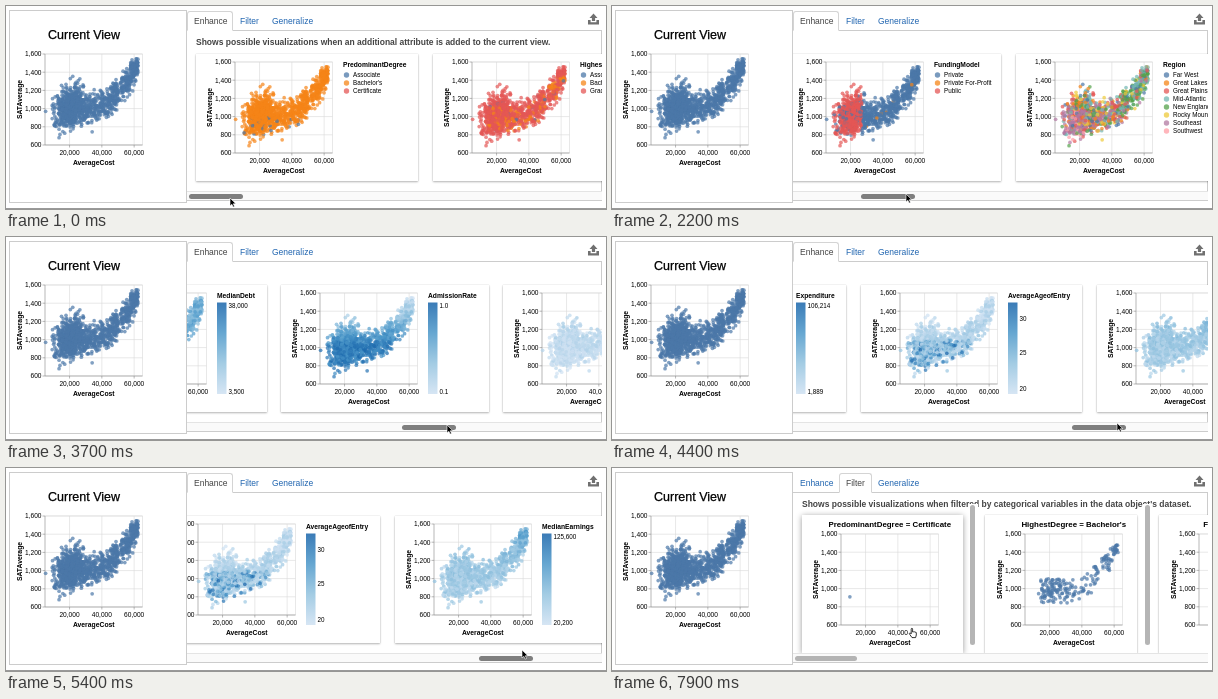
These frames come from a looping animation (600 px wide and 203 px high, 8 s). An HTML page with a canvas:

```html
<!DOCTYPE html>
<html lang="en">
<head>
<meta charset="utf-8">
<title>Recommended views</title>
<style>
html, body { margin: 0; width: 100%; height: 100%; overflow: hidden; background: #fff; }
#stage { position: relative; width: 600px; height: 203px; overflow: hidden; background: #fff;
  font-family: "Liberation Sans", Arial, sans-serif; }
#stage div, #stage svg, canvas { position: absolute; box-sizing: border-box; }
svg { overflow: visible; left: 0; top: 0; }
text { font-family: "Liberation Sans", Arial, sans-serif; }
.left { left: 3px; top: 4px; width: 178px; height: 193px; border: 1px solid #ccc; }
.right { left: 181px; top: 24px; width: 415px; height: 171px; border: 1px solid #ccc; border-left: 0; }
.heading { left: 42px; top: 21.5px; font-size: 12.5px; line-height: 15px; white-space: nowrap; -webkit-text-stroke: .25px #000; }
.tab { top: 5px; height: 20px; padding-left: 6px; border: 1px solid transparent; border-radius: 3px 3px 0 0;
  font-size: 8.5px; line-height: 18px; color: #2065b0; white-space: nowrap; }
.tab.hover { background: #eee; }
.tab.on { background: #fff; color: #444; border-color: #d4d4d4; border-bottom-color: #fff; }
.clip { left: 181px; top: 25px; width: 415px; height: 161px; overflow: hidden; }
.page { left: -181px; top: -25px; width: 0; height: 0; }
.note { left: 190px; top: 31px; font: bold 8.5px/10px "Liberation Sans", Arial, sans-serif; color: #444; white-space: nowrap; }
.card { background: #fff; box-shadow: 0 1px 2px rgba(0,0,0,.28), 0 0 1px rgba(0,0,0,.2); }
.card.lift { box-shadow: 0 1px 6px rgba(0,0,0,.4); }
.gutter { top: 36px; width: 9px; height: 142px; background: #fff; }
.gutter::after { content: ""; position: absolute; left: 1.5px; top: 1px; width: 5px; height: 140px; border-radius: 3px; background: #b5b5b5; }
.track { left: 181px; top: 185px; width: 415px; height: 10px; background: #fafafa; border: solid #e4e4e4; border-width: 1px 0 0; border-bottom: 1px solid #ccc; }
#thumb { left: 183px; top: 188px; height: 5px; border-radius: 3px; }
.base { left: 0; top: 202px; width: 600px; height: 1px; background: #999; }
</style>
</head>
<body>
<div id="stage">
  <div class="left"></div>
  <div class="heading">Current View</div>
  <div class="right"></div>
  <div class="tab" style="left:181px;width:46px">Enhance</div>
  <div class="tab" style="left:227px;width:33px">Filter</div>
  <div class="tab" style="left:259px;width:54px">Generalize</div>
  <svg width="600" height="203"><path fill="#707070" d="M587.5 7.5l4 4.5h-2.4v3h-3.2v-3h-2.4zM582 14h2.6v2.2h5.8v-2.2h2.6v4.6h-11z"/></svg>
  <div class="clip"><div class="page" id="enhance"></div><div class="page" id="filter"></div></div>
  <div class="track"></div>
  <div id="thumb"></div>
  <div class="base"></div>
</div>
<script>
const LOOP = 8000, STEP = 100, SCROLL_RATIO = 7.2;
const PLOT_W = 97.5, PLOT_H = 91;
const PALETTE = ['#4c78a8', '#f58518', '#e45756', '#72b7b2', '#54a24b', '#eeca3b', '#b279a2', '#ff9da6'];
const BLUES = [[207, 225, 242], [147, 195, 223], [75, 151, 201], [24, 100, 170]];
const stage = document.getElementById('stage');
const enhance = document.getElementById('enhance');
const filter = document.getElementById('filter');
const thumb = document.getElementById('thumb');
const tabs = document.querySelectorAll('.tab');

let seed = 20;
const rand = () => (seed = (seed * 16807) % 2147483647) / 2147483647;
const gauss = () => (rand() + rand() + rand() - 1.5) * 2;
const clamp = (v, a, b) => Math.min(b, Math.max(a, v));
const px = cost => (cost - 4.8) * 1.615;
const py = sat => PLOT_H * (1600 - sat) / 1000;
const trend = c => 990 + 510 * Math.max(0, (c - 28) / 34) ** 2.3;

function makeSchools() {
  const list = [[5.2, 970], [13.5, 680], [17, 730], [20.5, 1330], [34, 745], [22, 1355]]
    .map(([c, s]) => ({ c, s, low: false }));
  for (let i = 0; i < 1250; i++) {
    const k = rand(), low = k < .4;
    const c = low ? 20.5 + 5 * gauss() : k < .8 ? 15 + 35 * rand() : 44 + 18.5 * Math.sqrt(rand());
    const s = low ? 1020 + 105 * gauss() + 5 * (c - 20) : trend(c) + 78 * gauss();
    if (c > 9 && s > 690 && s < 1550) list.push({ c, s, low });
  }
  for (const p of list) { p.a = rand(); p.b = rand(); p.up = clamp((p.s - 900) / 600, 0, 1); }
  return list;
}
const schools = makeSchools();

function ramp(v) {
  const f = clamp(v, 0, .999) * 3, i = Math.floor(f);
  return `rgb(${BLUES[i].map((n, j) => Math.round(n + (BLUES[i + 1][j] - n) * (f - i)))})`;
}

const label = (x, y, str, opt = '') => `<text x="${x}" y="${y}" ${opt}>${str}</text>`;

function axes() {
  let grid = '', ticks = '', words = '';
  for (let s = 600; s <= 1600; s += 200) {
    grid += `M0 ${py(s)}H${PLOT_W}`;
    ticks += `M-2.5 ${py(s)}H0`;
    words += label(-3.5, py(s) + 2.3, s.toLocaleString('en-US'), 'text-anchor="end"');
  }
  for (const c of [20, 40, 60]) {
    grid += `M${px(c)} 0V${PLOT_H}`;
    ticks += `M${px(c)} ${PLOT_H}v2.5`;
    words += label(px(c), PLOT_H + 10, c + ',000', 'text-anchor="middle"');
  }
  const bold = 'text-anchor="middle" font-weight="bold" font-size="6.8"';
  return `<g fill="none" stroke-width=".6"><path stroke="#d8d8d8" d="${grid}M0 0H${PLOT_W}V${PLOT_H}"/>
    <path stroke="#888" d="${ticks}M0 0V${PLOT_H}H${PLOT_W}"/></g><g font-size="6.6">${words}</g>
    ${label(PLOT_W / 2, PLOT_H + 19.8, 'AverageCost', bold)}
    ${label(-PLOT_H / 2, -22.8, 'SATAverage', bold + ' transform="rotate(-90)"')}`;
}

function add(parent, cls, css, html = '') {
  const el = document.createElement('div');
  el.className = cls;
  el.style.cssText = css;
  el.innerHTML = html;
  parent.append(el);
  return el;
}

function chart(parent, x, y, points, color, extra = '') {
  const box = add(parent, '', `left:${x}px;top:${y}px`, `<svg width="1" height="1">${axes()}${extra}</svg>`);
  const cv = document.createElement('canvas'), dpr = window.devicePixelRatio || 1;
  cv.width = 106 * dpr; cv.height = 100 * dpr;
  cv.style.cssText = 'left:-4px;top:-4px;width:106px;height:100px';
  const g = cv.getContext('2d');
  g.scale(dpr, dpr);
  g.translate(4, 4);
  g.globalAlpha = .7;
  for (const p of points) {
    g.fillStyle = color(p);
    g.beginPath();
    g.arc(px(p.c), py(p.s), 1.85, 0, 7);
    g.fill();
  }
  box.append(cv);
}

const legendTitle = str => label(108, 4.8, str, 'font-weight="bold" font-size="6.7"');

function swatches(title, names) {
  return legendTitle(title) + names.map((n, i) =>
    `<circle cx="111.5" cy="${13 + i * 8}" r="2.7" fill="${PALETTE[i]}" opacity=".75"/>` +
    label(118, 15.2 + i * 8, n, 'font-size="6.3"')).join('');
}

function gradient(title, marks) {
  const id = 'g' + title;
  const stops = [0, 1, 2, 3].map(i => `<stop offset="${i / 3}" stop-color="${ramp(1 - i / 3)}"/>`).join('');
  return legendTitle(title) + `<linearGradient id="${id}" x2="0" y2="1">${stops}</linearGradient>
    <rect x="108" y="9.5" width="9.5" height="91.5" fill="url(#${id})" opacity=".85"/>` +
    marks.map(([str, y]) => label(119.5, y + 2.2, str, 'font-size="6.3"')).join('');
}
const ends = (top, bottom) => [[top, 13], [bottom, 98.5]];

const cat = fn => p => PALETTE[fn(p)];
const num = fn => p => ramp(fn(p) + (p.a - .5) * .3);

function region(p) {
  if (p.c > 45 && p.b < .5) return p.a < .45 ? 3 : 4;
  if (p.c < 24 && p.s < 1080 && p.b < .5) return p.a < .75 ? 6 : 7;
  return +'01122334566'[Math.floor(p.a * 11)];
}

const bachelor = p => p.a < (p.low ? .1 : .22) && p.c > 13 && p.s < 1480 && Math.abs(p.s - trend(p.c) + 20) < 140;
const CARDS = [
  [190, 222, swatches('PredominantDegree', ['Associate', "Bachelor's", 'Certificate']),
    cat(p => p.s < 1000 && p.c < 46 && p.a < .06 ? 0 : 1)],
  [427, 208, swatches('HighestDegree', ['Associate', "Bachelor's", 'Graduate']),
    cat(p => bachelor(p) ? 1 : p.a > .985 ? 0 : 2)],
  [650, 214, swatches('FundingModel', ['Private', 'Private For-Profit', 'Public']),
    cat(p => p.c < 27 && p.a < .85 ? 2 : p.b < .012 ? 1 : 0)],
  [879, 218, swatches('Region', ['Far West', 'Great Lakes', 'Great Plains', 'Mid-Atlantic', 'New England',
    'Rocky Mountains', 'Southeast', 'Southwest']), cat(region)],
  [1112, 228, gradient('MedianFamilyIncome', ends('116,545', '15,328')), num(p => .1 + .5 * p.up + .007 * p.c)],
  [1355, 228, gradient('AverageFacultySalary', ends('19,862', '1,476')), num(p => .25 + .6 * p.up)],
  [1598, 197, gradient('MedianDebt', ends('38,000', '3,500')), num(() => .5)],
  [1809, 208, gradient('AdmissionRate', ends('1.0', '0.1')), num(p => .82 - .9 * Math.max(0, p.up - .2))],
  [2031, 197, gradient('Expenditure', ends('106,214', '1,889')), num(p => .02 + .35 * p.up * p.up)],
  [2243, 221, gradient('AverageAgeofEntry', [['30', 26], ['25', 60], ['20', 95.5]]),
    num(p => p.s < 1080 && p.b < .35 ? .35 + 1.7 * p.b : .2 - .12 * p.up)],
  [2479, 211, gradient('MedianEarnings', ends('125,600', '20,200')), num(p => .22 + .34 * p.up * p.up)]
];

const blue = () => PALETTE[0];
chart(stage, 39, 47.5, schools, blue);

add(enhance, 'note', '', 'Shows possible visualizations when an additional attribute is added to the current view.');
for (const [x, w, legend, color] of CARDS) {
  const card = add(enhance, 'card', `left:${x}px;top:48px;width:${w}px;height:127px`);
  chart(card, 39, 8, schools, color, legend);
}

add(filter, 'note', '', "Shows possible visualizations when filtered by categorical variables in the data object's dataset.");
const FILTERS = [
  [190, 161, 38.5, 'PredominantDegree = Certificate', [{ c: 10.3, s: 910 }]],
  [373, 152, 39.5, "HighestDegree = Bachelor's", schools.filter(bachelor)],
  [547, 152, 39.5, 'FundingModel = Private', schools.filter(p => p.c > 27)]
];
FILTERS.forEach(([x, w, dx, title, points], i) => {
  const card = add(filter, i ? 'card' : 'card lift', `left:${x}px;top:47px;width:${w}px;height:138px`);
  chart(card, dx, 19, points, blue,
    label(PLOT_W / 2, -7.2, title, 'text-anchor="middle" font-weight="bold" font-size="7.9"'));
});
for (const x of [356.5, 531]) add(filter, 'gutter', `left:${x}px`);

const pointer = add(stage, '', 'left:0;top:0', `<svg width="12" height="12">
  <path id="arrow" d="M0 0v8l1.9-1.7 1.2 2.8 1.4-.6-1.2-2.7h2.6z" fill="#000" stroke="#fff" stroke-width=".6"/>
  <path id="hand" transform="translate(-3 0)" fill="#fff" stroke="#000" stroke-width=".8" stroke-linejoin="round"
    d="M3 9.6L.6 6.2q-.6-1 .2-1.3.7 0 1.4 1V1.2q0-.9.7-.9t.7.9V4q.7-.5 1.3 0 .7-.4 1.3.2 1-.4 1.1.6V7L6.6 9.6z"/></svg>`);
const arrow = document.getElementById('arrow'), hand = document.getElementById('hand');

// [time, thumb offset]
const DRAG = [[1000, 0], [1200, 4], [1500, 17], [1800, 34], [2200, 66], [2900, 137], [3700, 213],
  [4400, 277], [4700, 286], [5100, 290.3]];
// [time, x, y]; x follows the thumb while dragging
const MOVES = [[0, 224, 192], [100, 224, 192], [300, 228, 188], [3700, 228, 188], [4400, 228, 186], [5200, 518, 186],
  [5400, 516, 182], [5700, 395, 105], [6100, 252, 19], [6300, 242, 13], [7200, 242, 13], [7600, 272, 95], [7900, 300, 160]];

function at(table, t, col = 1) {
  const i = table.findIndex(row => row[0] > t);
  if (i < 0) return table[table.length - 1][col];
  if (!i) return table[0][col];
  const a = table[i - 1], b = table[i];
  return a[col] + (b[col] - a[col]) * (t - a[0]) / (b[0] - a[0]);
}

function render(t) {
  const filtered = t >= 7300, drag = at(DRAG, t);
  const x = t > 300 && t <= 5200 ? 228 + drag : at(MOVES, t), y = at(MOVES, t, 2);
  const onHand = y < 25 || (y > 48 && y < 175);
  enhance.style.transform = `translateX(${-Math.round(drag * SCROLL_RATIO)}px)`;
  enhance.style.visibility = filtered ? 'hidden' : 'visible';
  filter.style.visibility = filtered ? 'visible' : 'hidden';
  tabs[0].className = filtered ? 'tab' : 'tab on';
  tabs[1].className = filtered ? 'tab on' : t >= 6500 ? 'tab hover' : 'tab';
  thumb.style.width = (filtered ? 62 : 54) + 'px';
  thumb.style.transform = `translateX(${filtered ? 0 : Math.round(drag)}px)`;
  thumb.style.background = t > 5400 ? '#b4b4b4' : '#7f7f7f';
  pointer.style.transform = `translate(${x}px, ${y}px)`;
  arrow.style.display = onHand ? 'none' : '';
  hand.style.display = onHand ? '' : 'none';
}

const start = performance.now();
function tick() {
  const t = Math.max(0, performance.now() - start) % LOOP;
  render(Math.floor(t / STEP) * STEP);
  requestAnimationFrame(tick);
}
tick();
</script>
</body>
</html>
```
